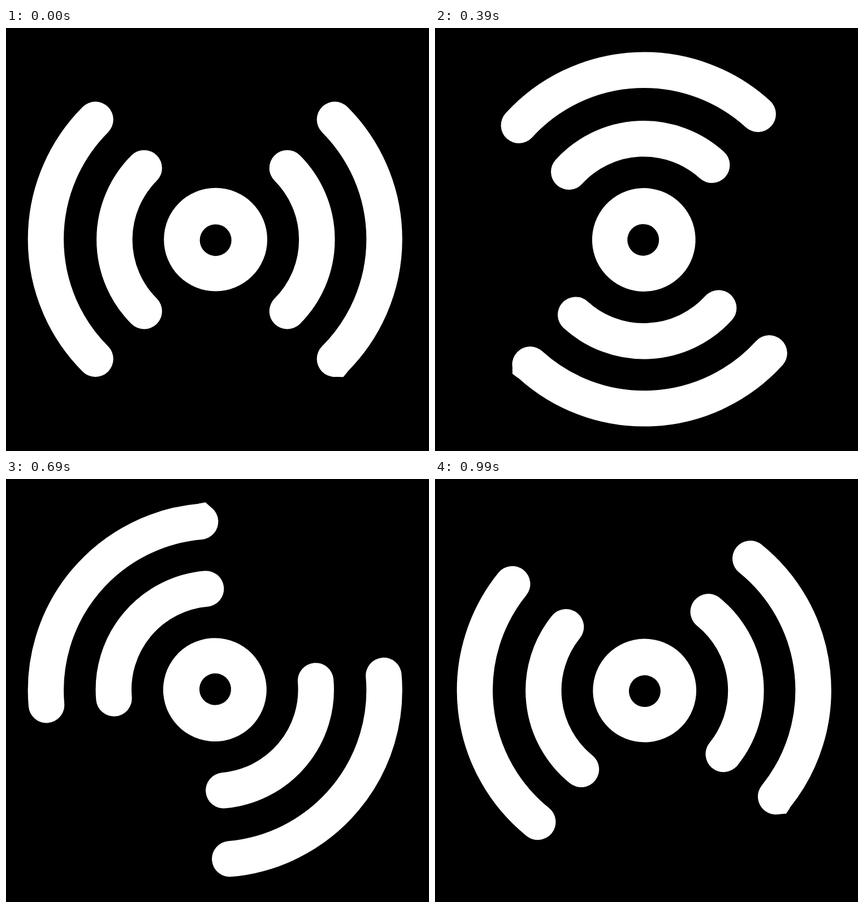
An HTML page for the animation above (1.02 s loop, 748x748 px).

```html
<!DOCTYPE html>
<html lang="en">
<head>
<meta charset="utf-8">
<title>Spinning signal</title>
<style>
  html, body { margin: 0; height: 100%; overflow: hidden; background: #000; }
  svg { display: block; width: 100%; height: 100%; }
</style>
</head>
<body>
<svg viewBox="0 0 748 748">
  <g id="signal" fill="#fff">
    <g id="arcs" fill="none" stroke="#fff" stroke-width="63.4" stroke-linecap="round"></g>
    <path d="M596.3 617.3L576 616.5L588 588L604 608Z"/>
    <circle cx="370.6" cy="374.1" r="91.4"/>
    <circle cx="370.7" cy="375.2" r="28" fill="#000"/>
  </g>
</svg>
<script>
const LOOP = 1020, STEP = 30, CX = 369.7, CY = 373.6;
const signal = document.getElementById('signal');
const arcs = document.getElementById('arcs');

// Quarter arc centred on the horizontal axis; side is -1 (left) or 1 (right)
function addArc(cx, cy, r, side) {
  const d = r * Math.SQRT1_2, x = cx + side * d;
  const path = document.createElementNS('http://www.w3.org/2000/svg', 'path');
  path.setAttribute('d', `M${x} ${cy - d}A${r} ${r} 0 0 ${side > 0 ? 1 : 0} ${x} ${cy + d}`);
  arcs.append(path);
}
for (const side of [-1, 1]) {
  addArc(CX, CY, 299.3, side);
  addArc(370.8, 374.2, 179, side);
}

// Spin keys: step, degrees, degrees per step
const keys = [
  [0, 0, 0.4], [7, 26.5, 7.2], [13, 87.3, 11.3], [17, 135.5, 12.9],
  [23, 220, 15.3], [27, 284.2, 14.3], [33, 353.9, 8], [34, 360, 4]
];

function angle(step) {
  const i = keys.findIndex(k => k[0] > step);
  const [t0, a0, v0] = keys[i - 1], [t1, a1, v1] = keys[i];
  const h = t1 - t0, u = (step - t0) / h, w = 1 - u;
  return a0 * w * w * (1 + 2 * u) + a1 * u * u * (3 - 2 * u)
    + h * u * w * (v0 * w - v1 * u);
}

const start = performance.now();
function draw(now) {
  const step = Math.floor(Math.max(0, now - start) % LOOP / STEP);
  signal.setAttribute('transform', `rotate(${angle(step)} ${CX} ${CY})`);
  requestAnimationFrame(draw);
}
draw(start);
</script>
</body>
</html>
```
